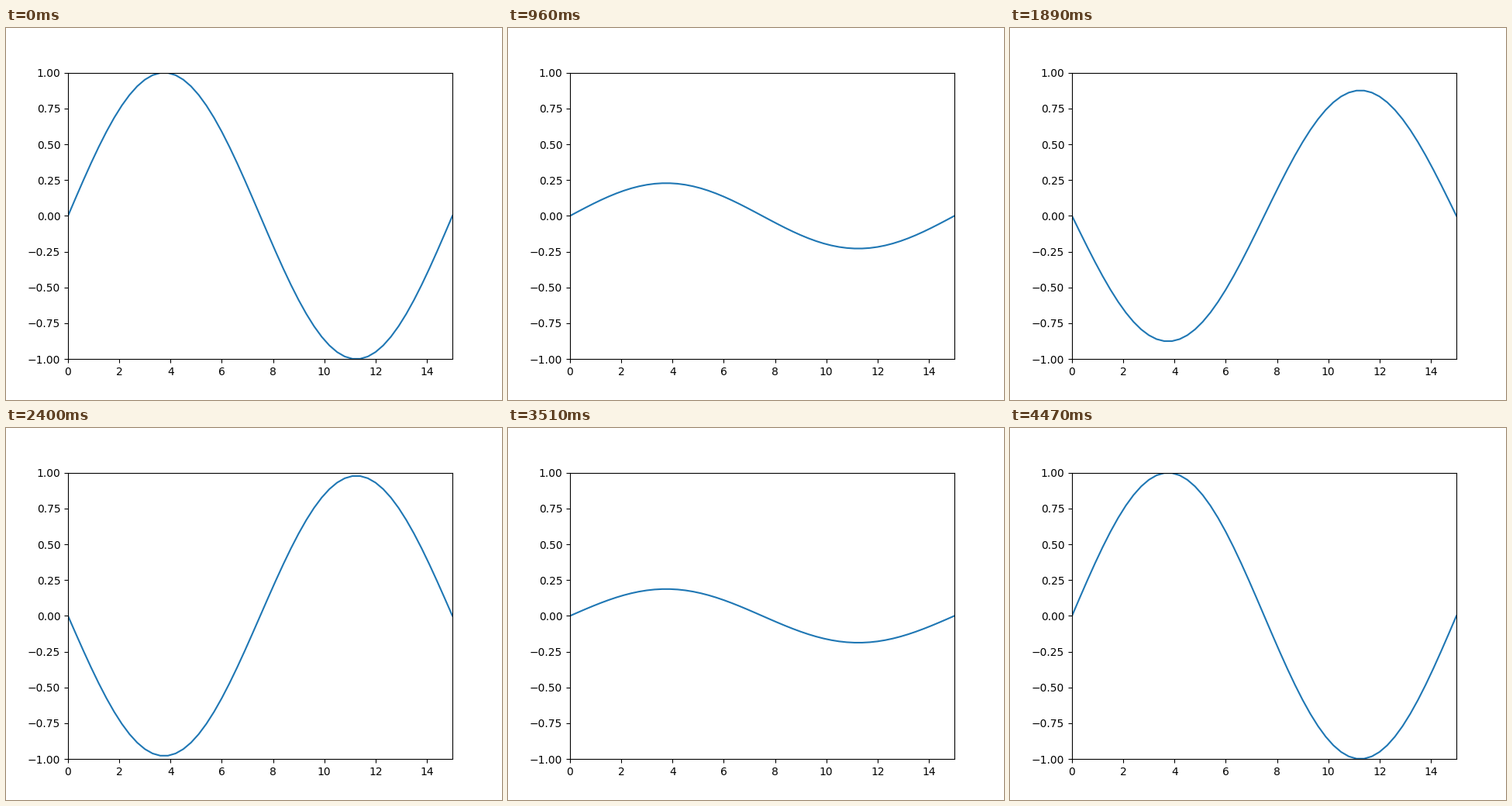
Write a matplotlib script that moves like this. It is 640 px wide and 480 px high and loops after 4.5 s.

```python
import numpy as np
import matplotlib.pyplot as plt
from matplotlib.animation import FuncAnimation

LENGTH = 15
FRAMES = 150
INTERVAL = 30  # ms

x = np.linspace(0, LENGTH, 51)
mode = np.sin(2 * np.pi * x / LENGTH)

fig, ax = plt.subplots(figsize=(6.4, 4.8), dpi=100)
ax.set_xlim(0, LENGTH)
ax.set_ylim(-1, 1)
line, = ax.plot(x, mode, color="#1f77b4", lw=1.5)


def update(frame):
    """Standing wave: a fixed shape whose amplitude swings once per loop."""
    line.set_ydata(mode * np.cos(2 * np.pi * frame / FRAMES))
    return line,


anim = FuncAnimation(fig, update, frames=FRAMES, interval=INTERVAL,
                     repeat=True, repeat_delay=0)
plt.show()
```
